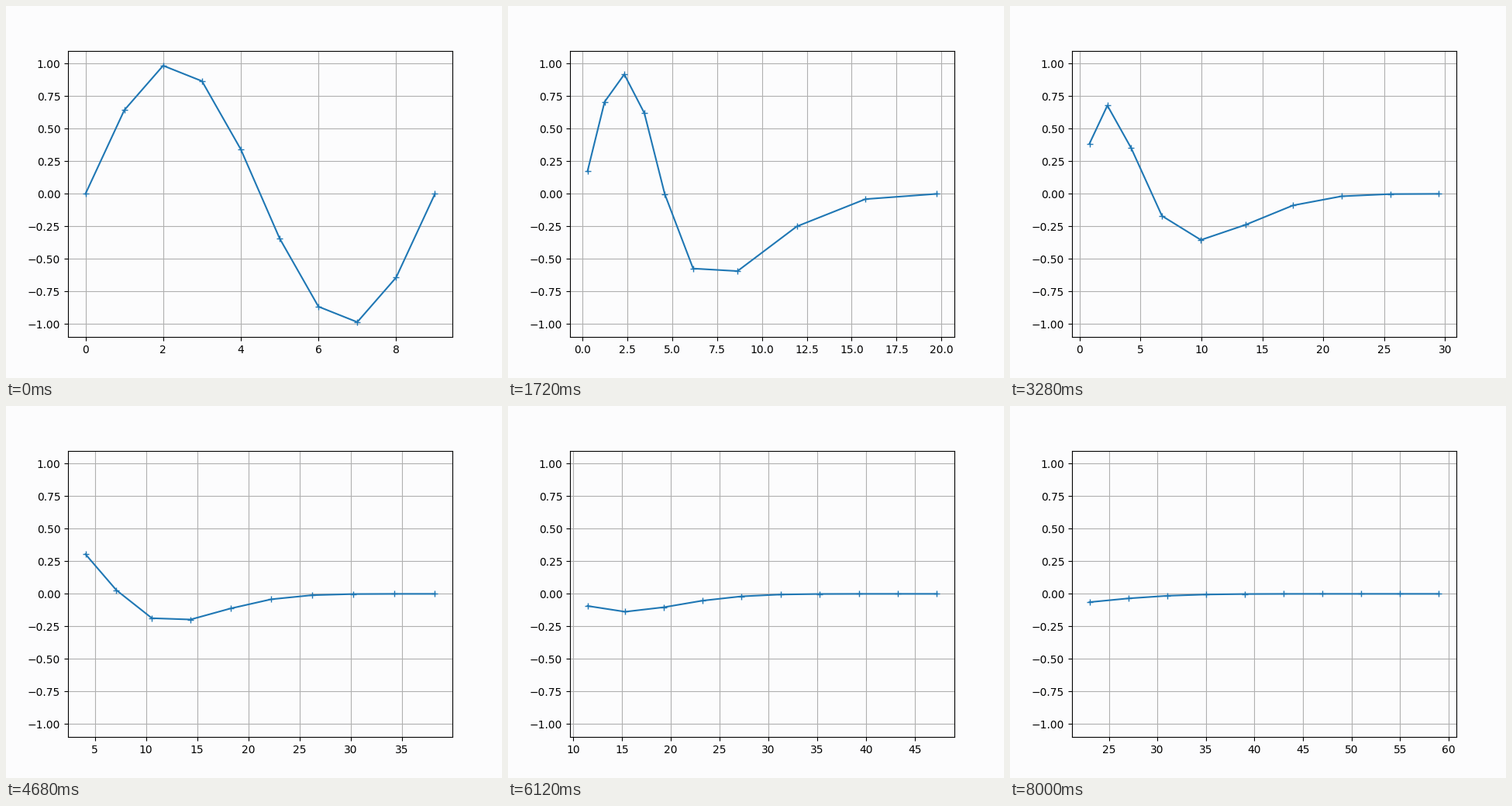
Recreate the animation shown at these times as a matplotlib script. Size 640x480 px, loop 8040 ms.

```python
import numpy as np
import matplotlib.pyplot as plt
from matplotlib.animation import FuncAnimation

FRAMES, INTERVAL = 201, 40
DT, SUBSTEPS = 0.25, 20        # time per frame, integration steps per frame
REST, DRAG, SPEED = 1.0, 1.4, 1.0
PULL = DRAG * SPEED / 3        # steady spacing becomes REST + 3
PAPER = "#fcfcfd"


def accel(pos, vel):
    """Each bead is pulled by a spring to the one ahead; the last one is towed."""
    gap = np.diff(pos, axis=0)
    dist = np.hypot(gap[:, 0], gap[:, 1])[:, None]
    acc = np.zeros_like(pos)
    acc[:-1] = PULL * (dist - REST) * gap / dist - DRAG * vel[:-1]
    return acc


def simulate():
    x = np.arange(10.0)
    pos = np.column_stack([x, np.sin(2 * np.pi * x / 9)])
    vel = np.zeros_like(pos)
    vel[-1, 0] = SPEED
    h = DT / SUBSTEPS
    path = [pos.copy()]
    for _ in range(FRAMES - 1):
        for _ in range(SUBSTEPS):
            mid_vel = vel + accel(pos, vel) * h / 2
            mid_pos = pos + vel * h / 2
            vel = vel + accel(mid_pos, mid_vel) * h
            pos = pos + mid_vel * h
        path.append(pos.copy())
    return path


path = simulate()

fig, ax = plt.subplots(figsize=(6.4, 4.8), dpi=100, facecolor=PAPER)
ax.set_facecolor(PAPER)
ax.grid(True)
ax.set_ylim(-1.1, 1.1)
line, = ax.plot([], [], "+-", color="#1f77b4")


def update(n):
    x, y = path[n].T
    line.set_data(x, y)
    margin = 0.05 * (x.max() - x.min())
    ax.set_xlim(x.min() - margin, x.max() + margin)
    return line,


anim = FuncAnimation(fig, update, frames=FRAMES, interval=INTERVAL,
                     init_func=lambda: update(0), repeat=True, repeat_delay=0)
plt.show()
```
